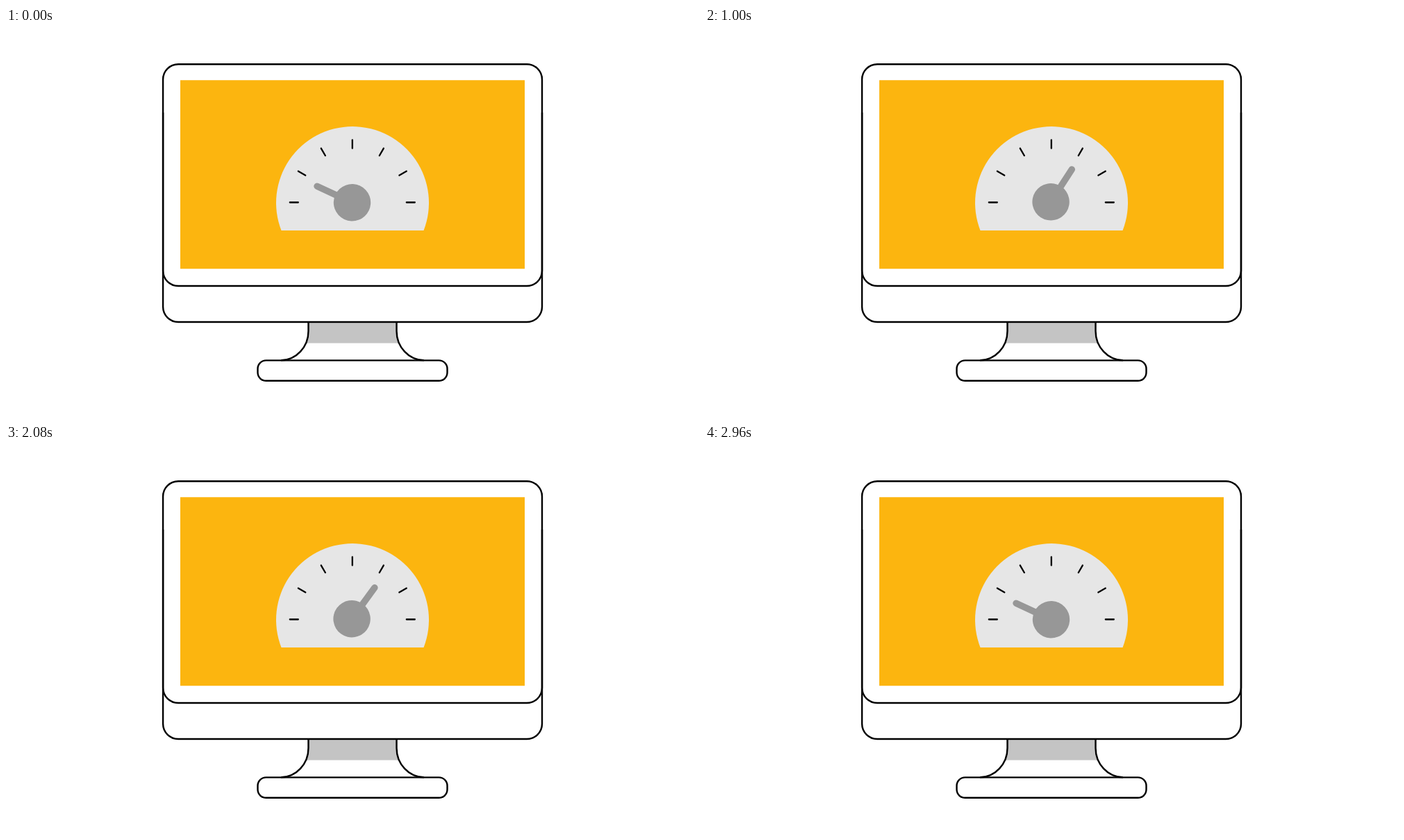
These frames come from a looping animation (998 px wide and 561 px high, 3000 ms). An HTML page:

```html
<!DOCTYPE html>
<html lang="en">
<head>
<meta charset="utf-8">
<title>Gauge</title>
<style>
  html, body { margin: 0; width: 100%; height: 100%; overflow: hidden; background: #fff; }
  svg { display: block; width: 100vw; height: 100vh; }
</style>
</head>
<body>
<svg viewBox="0 0 998 561">
  <path d="M435.5 424V437Q435.5 446 433 454.500H565Q562.500 446 562.500 437V424Z" fill="#c4c4c4"/>
  <g fill="none" stroke="#000" stroke-width="2.4">
    <path d="M435.500 424V437C435.500 460 418 479 396 479.300M562.500 424V437C562.500 460 580 479 602 479.300"/>
    <rect x="362.500" y="479.400" width="273" height="29.400" rx="12"/>
    <path d="M226.100 122V402a22 22 0 0 0 22 22H750a22 22 0 0 0 22-22V122"/>
    <rect x="226.100" y="52.200" width="545.900" height="319.800" rx="22"/>
  </g>
  <path d="M251 75.200H747V347.300H251Z" fill="#fcb50f"/>
  <path d="M396.500 292A110 110 0 1 1 601.500 292Z" fill="#e6e6e6"/>
  <g id="ticks" stroke="#000" stroke-width="2.300" stroke-linecap="round"></g>
  <g id="needle" fill="#979797" stroke="#979797">
    <path d="M498 251V195.500" stroke-width="9.500" stroke-linecap="round"/>
    <circle cx="498" cy="251.150" r="26.700" stroke="none"/>
  </g>
</svg>
<script>
  const LOOP = 3000, STEP = 40;
  // [time in ms, needle angle in degrees from vertical]
  const keys = [[0, -65], [160, -65], [600, 52], [900, 30], [1520, 75.5],
                [1840, 75.5], [2120, 34], [2380, 48], [2960, -65], [LOOP, -65]];
  const ticks = document.getElementById('ticks');
  const needle = document.getElementById('needle');

  for (let a = -90; a <= 90; a += 30)
    ticks.innerHTML += `<path d="M0-90V-78" transform="translate(498.8 251.5) rotate(${a})"/>`;

  const ease = u => (1 - Math.cos(Math.PI * u)) / 2;

  function angleAt(t) {
    const i = keys.findIndex(k => k[0] > t);
    const [t0, a0] = keys[i - 1], [t1, a1] = keys[i];
    return a0 + (a1 - a0) * ease((t - t0) / (t1 - t0));
  }

  function draw() {
    const t = Math.floor(performance.now() % LOOP / STEP) * STEP;
    needle.setAttribute('transform', `rotate(${angleAt(t)} 498.7 251.05)`);
    requestAnimationFrame(draw);
  }
  draw();
</script>
</body>
</html>
```
